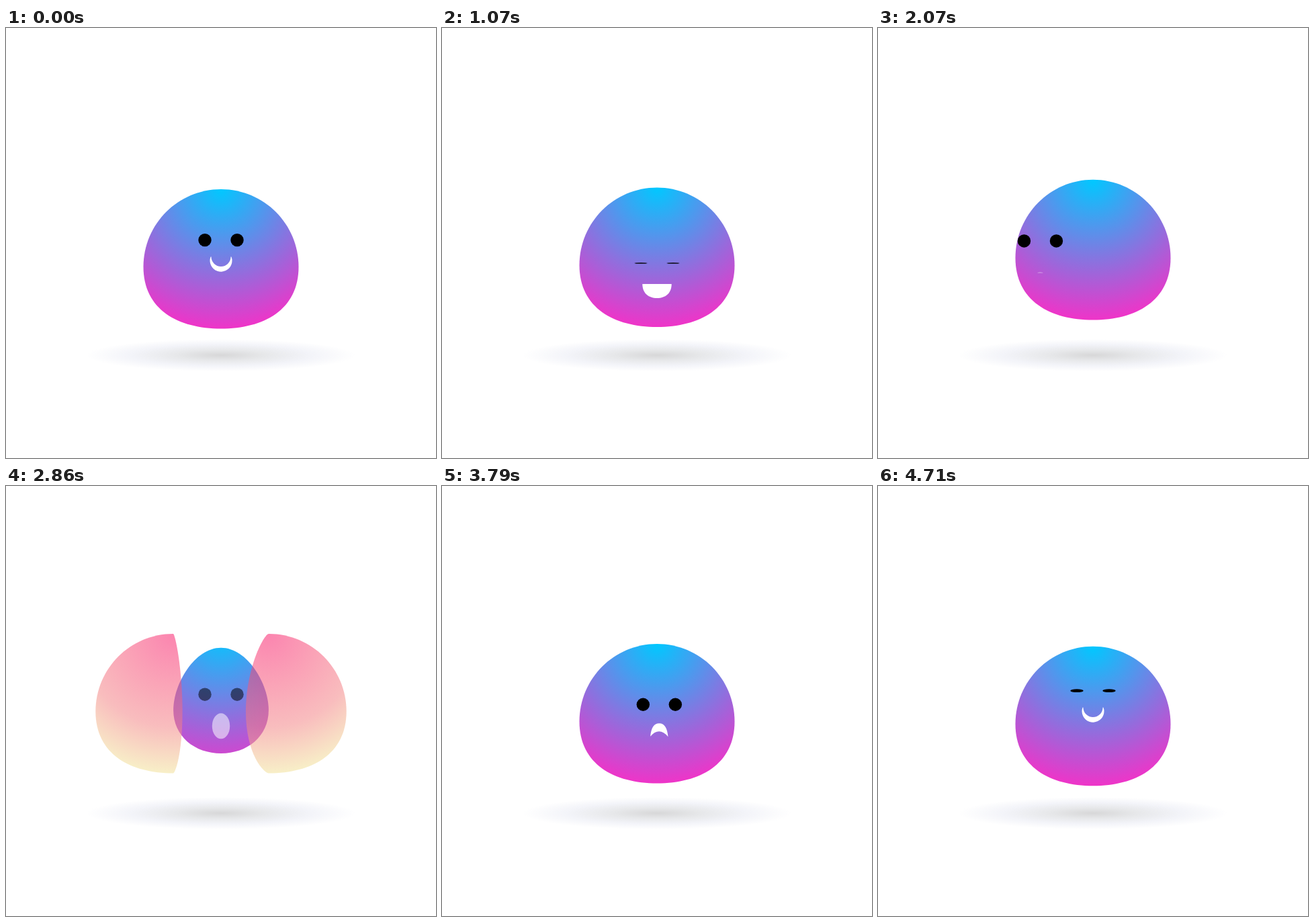
An HTML page with a canvas that plays this animation: 640x640 px, repeating every 4780 ms.

```html
<!DOCTYPE html>
<html lang="en">
<head>
<meta charset="utf-8">
<title>Blob moods</title>
<style>
html, body { margin: 0; width: 100%; height: 100%; overflow: hidden; background: #fff; }
canvas { display: block; width: 640px; height: 640px; }
</style>
</head>
<body>
<canvas id="stage" width="640" height="640"></canvas>
<script>
const ctx = document.getElementById('stage').getContext('2d');

const LOOP = 4780, STEPS = 67, FPS = 14, CYCLE = 1200;
const SPLIT = 400, MORPH = 660, FACE_IN = 860;
const CX = 320, WAIST = 355.5, RX = 115.5, TOP = 115.5, BOTTOM = 92;
const EGG_TOP = 151, EGG_BOTTOM = 105, EGG_WAIST = 16;
const ROUND = 0.5523, CENTER_TO_WAIST = (TOP - BOTTOM) / 2;

const clamp = v => Math.max(0, Math.min(1, v));
const lerp = (a, b, t) => a + (b - a) * t;
const easeOut = (t, power) => 1 - Math.pow(1 - clamp(t), power);
const mix = (a, b, t) => a.map((v, i) => Math.round(lerp(v, b[i], t)));
const rgb = c => `rgb(${c.join(',')})`;

const COOL = [0, 1, 2, 3].map(i => mix([0, 200, 255], [239, 52, 200], i / 3));
const WARM = [[248, 25, 105], [246, 78, 118], [243, 130, 132], [241, 225, 150]];

function radial(x, y, r, colors) {
  const g = ctx.createRadialGradient(x, y, 0, x, y, r);
  colors.forEach((c, i) => g.addColorStop(i / (colors.length - 1), rgb(c)));
  return g;
}

// Four quarter curves around a waist point; widths may be negative.
// The waist handles have equal length above and below.
function bodyPath(x, y, left, right, top, bottom, scale = 1, kLeft = ROUND, kRight = ROUND) {
  const handle = RX * ROUND * scale;
  ctx.beginPath();
  ctx.moveTo(x, y - top);
  ctx.bezierCurveTo(x + right * kRight, y - top, x + right, y - handle, x + right, y);
  ctx.bezierCurveTo(x + right, y + handle, x + right * kRight, y + bottom, x, y + bottom);
  ctx.bezierCurveTo(x - left * kLeft, y + bottom, x - left, y + handle, x - left, y);
  ctx.bezierCurveTo(x - left, y - handle, x - left * kLeft, y - top, x, y - top);
  ctx.closePath();
}

function drawShadow() {
  ctx.save();
  ctx.translate(CX, 487);
  ctx.scale(200, 24);
  ctx.fillStyle = radial(0, 0, 1, [[215, 215, 216], [231, 232, 234], [243, 244, 249], [255, 255, 255]]);
  ctx.beginPath();
  ctx.arc(0, 0, 1, 0, Math.PI * 2);
  ctx.fill();
  ctx.restore();
}

const spread = phase => easeOut((phase - SPLIT) / 270, 4);

function drawBody(phase, waist) {
  const whole = phase < SPLIT;
  const grow = whole ? 1 : spread(phase);
  const settle = whole ? 1 : easeOut((phase - MORPH) / 300, 3);
  const y = waist - CENTER_TO_WAIST + lerp(EGG_WAIST, CENTER_TO_WAIST, settle) * grow;
  bodyPath(CX, y, RX * grow, RX * grow,
    lerp(EGG_TOP, TOP, settle) * grow,
    lerp(EGG_BOTTOM, BOTTOM, settle) * grow, grow);
  ctx.fillStyle = radial(CX, waist - TOP, 208, COOL);
  ctx.fill();
}

function drawHalves(phase, waist) {
  const since = phase - SPLIT;
  if (since < 0 || since > 300) return;
  const open = spread(phase);
  const warmth = clamp(since / 55);
  const colors = COOL.map((c, i) => mix(c, WARM[i], warmth));
  const bulgeLeft = 123 * Math.exp(-since / 33) - 8;
  const bulgeRight = RX * Math.exp(-since / 47);
  const innerRound = ROUND * (1 - open);
  ctx.globalAlpha = Math.pow(1 - since / 300, 3);
  for (const side of [-1, 1]) {
    const x = CX + side * 116 * open;
    if (side < 0) bodyPath(x, waist, RX, bulgeLeft, TOP, BOTTOM, 1, ROUND, innerRound);
    else bodyPath(x, waist, bulgeRight, RX, TOP, BOTTOM, 1, innerRound, ROUND);
    ctx.fillStyle = radial(x, waist - TOP, 208, colors);
    ctx.fill();
  }
  ctx.globalAlpha = 1;
}

// Mouth paths are relative to their own centre.
const faces = [
  { dx: 0, dy: -77, mouthY: 36, mouth() {
    ctx.arc(0, -5.5, 16.5, Math.PI + 0.34, -0.34, true);
    ctx.arc(0, -11.3, 14.6, 0, Math.PI);
  } },
  { dx: 0, dy: 56, mouthY: 41.5, mouth() {
    ctx.moveTo(-21.7, -10.5);
    ctx.lineTo(21.7, -10.5);
    ctx.bezierCurveTo(21.7, 3, 13, 10.5, 0, 10.5);
    ctx.bezierCurveTo(-13, 10.5, -21.7, 3, -21.7, -10.5);
  } },
  { dx: -82, dy: 0, mouthY: 47, mouth() {
    ctx.ellipse(0, 0, 13.2, 19, 0, 0, Math.PI * 2);
  } },
  { dx: 82, dy: 0, mouthY: 38, mouth() {
    ctx.moveTo(-13.2, 9.5);
    ctx.bezierCurveTo(-12, -3, -8, -10, 0, -10);
    ctx.bezierCurveTo(8, -10, 12, -3, 13.2, 10);
    ctx.quadraticCurveTo(0, -5.5, -13.2, 9.5);
  } }
];

function drawFace(face, age, phase, waist, alpha) {
  const away = 1 - easeOut(age / 800, 3);
  const open = clamp(Math.abs(phase - 1082) / 130) * clamp((age + 20) / 30);
  const grown = clamp(age / 100);
  ctx.save();
  ctx.globalAlpha = alpha;
  ctx.translate(CX + face.dx * away, waist - 25.2 + face.dy * away);
  ctx.fillStyle = '#000';
  for (const x of [-24, 24]) {
    ctx.beginPath();
    ctx.ellipse(x, 0, 9.7, 9.7 * open, 0, 0, Math.PI * 2);
    ctx.fill();
  }
  ctx.translate(0, face.mouthY);
  ctx.scale(Math.sqrt(grown), grown * grown);
  ctx.fillStyle = '#fff';
  ctx.beginPath();
  face.mouth();
  ctx.fill();
  ctx.restore();
}

function draw(time) {
  const phase = time % CYCLE;
  const index = Math.floor(time / CYCLE);
  const waist = WAIST - 11.6 * (1 - Math.cos(phase / CYCLE * Math.PI * 2));

  ctx.fillStyle = '#fff';
  ctx.fillRect(0, 0, 640, 640);
  drawShadow();
  drawBody(phase, waist);
  drawHalves(phase, waist);

  const fade = phase < SPLIT ? 1 : Math.pow(1 - clamp((phase - SPLIT) / 300), 3);
  if (fade > 0) {
    drawFace(faces[index], phase + CYCLE - FACE_IN, phase, waist, fade);
  } else if (phase > FACE_IN - 20) {
    drawFace(faces[(index + 1) % 4], phase - FACE_IN, phase, waist, 1);
  }
}

const start = performance.now();

function tick() {
  const elapsed = (performance.now() - start) % LOOP;
  const step = Math.floor((elapsed + 7) / (LOOP / STEPS)) % STEPS;
  draw(step * 1000 / FPS);
  requestAnimationFrame(tick);
}
tick();
</script>
</body>
</html>
```
